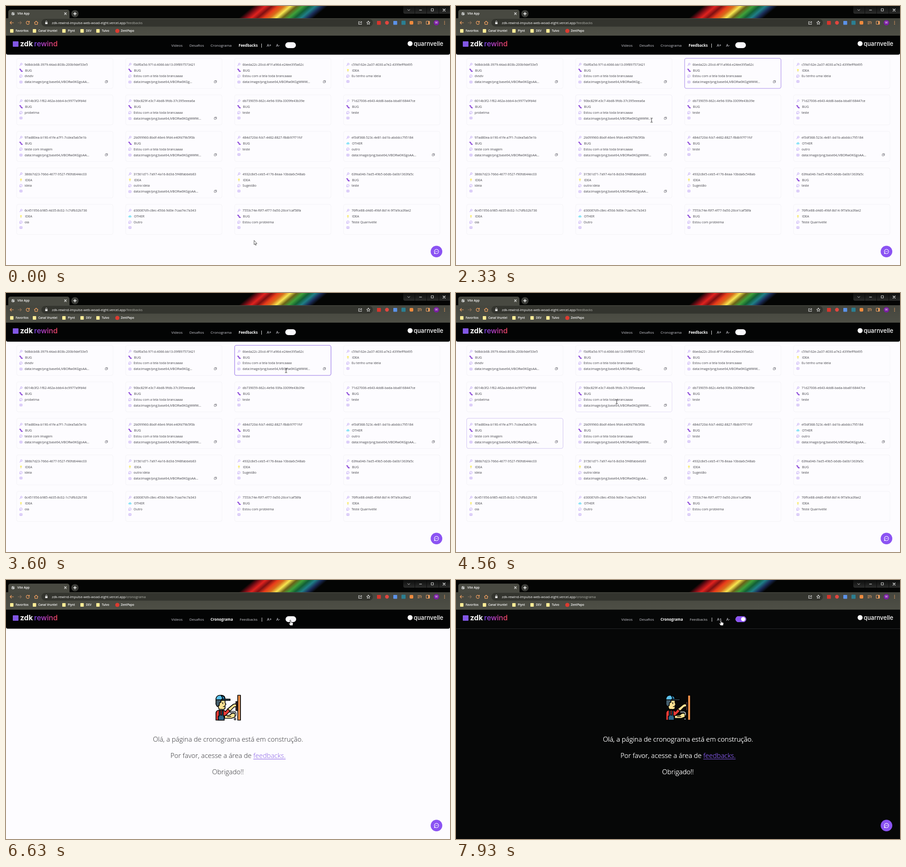
An HTML page with a canvas for the animation above (8 s loop, 979x572 px).

```html
<!DOCTYPE html>
<html lang="pt">
<head>
<meta charset="utf-8">
<title>Feedbacks</title>
<style>
  html, body { margin: 0; width: 100%; height: 100%; overflow: hidden; background: #000; }
  canvas { display: block; width: 979px; height: 572px; }
</style>
</head>
<body>
<canvas id="stage"></canvas>
<script>
const W = 979, H = 572, LOOP = 8000;
const PAGE_SWITCH = 5230, DARK_SWITCH = 6900;
const PURPLE = '#8257e5', LILAC = '#ad8cf0', ORANGE = '#f0a060', GREY = '#c8c8d0';
const SANS = '"Open Sans", "Noto Sans", sans-serif';

const canvas = document.getElementById('stage');
const ctx = canvas.getContext('2d');
const ratio = window.devicePixelRatio || 1;
canvas.width = W * ratio;
canvas.height = H * ratio;

// ---------- helpers ----------
const clamp = v => Math.max(0, Math.min(1, v));

function box(x, y, w, h, r, fill, stroke, width = 1) {
  ctx.beginPath();
  ctx.roundRect(x, y, w, h, r);
  if (fill) { ctx.fillStyle = fill; ctx.fill(); }
  if (stroke) { ctx.strokeStyle = stroke; ctx.lineWidth = width; ctx.stroke(); }
}

function dot(x, y, r, fill, stroke, width = 1) {
  ctx.beginPath();
  ctx.arc(x, y, r, 0, Math.PI * 2);
  if (fill) { ctx.fillStyle = fill; ctx.fill(); }
  if (stroke) { ctx.strokeStyle = stroke; ctx.lineWidth = width; ctx.stroke(); }
}

function shape(x, y, d, fill, stroke, width = 1) {
  const p = new Path2D(d);
  ctx.save();
  ctx.translate(x, y);
  ctx.lineCap = ctx.lineJoin = 'round';
  if (fill) { ctx.fillStyle = fill; ctx.fill(p); }
  if (stroke) { ctx.strokeStyle = stroke; ctx.lineWidth = width; ctx.stroke(p); }
  ctx.restore();
}

// y is the middle of the capitals
function label(text, x, y, size, color, weight = 400, align = 'left', family = SANS) {
  ctx.font = `${weight} ${size}px ${family}`;
  ctx.textAlign = align;
  ctx.fillStyle = color;
  ctx.fillText(text, x, y + size * 0.36);
  return ctx.measureText(text).width;
}

function gradient(x0, y0, x1, y1, ...colors) {
  const g = ctx.createLinearGradient(x0, y0, x1, y1);
  colors.forEach((c, i) => g.addColorStop(i / (colors.length - 1), c));
  return g;
}

// ---------- cards ----------
const mime = 'image/png';
const image = tail => `data:${mime};base${64},iVBORw0KGg${tail}...`;
const BLANK = 'Estou com a tela toda brancaaaa';
const CARDS = [
  ['9d8dcb68-3979-44ad-803b-200b9def33e5', 'BUG', 'dvsdv', image('oAA')],
  ['f3df0a5d-971d-4066-bb13-09f897573421', 'BUG', BLANK, image('')],
  ['6beda22c-20cd-4f1f-a96d-e24ee395a62c', 'BUG', BLANK, image('WWW')],
  ['c59d162e-2a37-4030-a7e2-4399efffd495', 'IDEA', 'Eu tenho uma ideia'],
  ['6014b3f2-1f82-462a-bbb4-bc9977a9fd4d', 'BUG', 'probelma'],
  ['90bc829f-e3c7-4bd8-9fdb-37c395eeea6a', 'BUG', BLANK, image('WWW')],
  ['db739059-662c-4e9d-93fa-3309fe43b39e', 'BUG', 'teste'],
  ['71d27006-e643-4dd8-bada-bba8168447ce', 'BUG', 'teste'],
  ['97ad80ea-b190-41fe-a7f1-7cdea5ab5e1b', 'BUG', 'teste com imagem', image('oAA')],
  ['2b099960-8bdf-46e4-9fd4-e40fd79b5f0b', 'BUG', BLANK, image('WWW')],
  ['484d720d-fcb7-4482-8827-f8db97f71fcf', 'BUG', 'teste'],
  ['ef3df368-523c-4e81-bd1b-abddcc795184', 'OTHER', 'outro', image('oAA')],
  ['386b7d23-766d-4677-9527-f90fd644ec03', 'IDEA', 'ideia'],
  ['31561d71-7a97-4a16-8d3d-5f48fabbeb83', 'IDEA', 'outra ideia', image('oAA')],
  ['4932c8e5-ceb5-4176-8eaa-10bda6c548ab', 'IDEA', 'Sugestão'],
  ['63fea046-7ad5-49b5-b6db-0a0b1363fa5c', 'BUG', 'teste'],
  ['6c451956-b985-4d35-8c02-1c7dfb32b736', 'IDEA', 'ola'],
  ['d30087d9-c8ec-450d-9d0e-7caa7ec7a343', 'OTHER', 'Outro'],
  ['7553c74e-f6f7-4f77-9a50-26ce1caf58fa', 'BUG', 'Estou com problema'],
  ['76ffce88-d4d0-49bf-8d14-9f7a9ca3fae2', 'IDEA', 'Teste Quarnvelle'],
].map(([id, kind, text, shot], i) =>
  ({ id, kind, text, shot, x: 23 + 240.3 * (i % 4), y: 115 + 80.65 * Math.floor(i / 4) }));
const CARD_W = 213, CARD_H = 67;

const inside = (p, c) => p.x > c.x && p.x < c.x + CARD_W && p.y > c.y && p.y < c.y + CARD_H;

const KIND_ICONS = {
  BUG: (x, y) => shape(x, y, 'M-2.6-2.4Q-.6-2.8-.2-.2T3 2.2', null, '#8a45d8', 2.2),
  IDEA(x, y) {
    dot(x, y - 0.8, 2.1, '#fbef7a');
    box(x - 0.9, y + 1.2, 1.8, 2, 0.5, '#e3d98c');
  },
  OTHER(x, y) {
    box(x - 3.6, y - 1.4, 7.2, 3.8, 1.9, '#8fe4f7');
    dot(x + 0.3, y - 0.7, 2, '#8fe4f7');
  },
};

function bubble(x, y, r, color, width) {
  dot(x, y, r, null, color, width);
  shape(x, y, `M${-r * 0.8} ${r * 0.55}L${-r} ${r}L${-r * 0.4} ${r * 0.9}`, null, color, width);
  for (const k of [-1, 0, 1]) dot(x + k * r * 0.45, y, r * 0.16, color);
}

function drawCard(card, glow) {
  const { x, y } = card, left = x + 10, tx = x + 18, top = y + 14;
  box(x + 0.5, y + 0.5, CARD_W - 0.5, CARD_H - 0.5, 4, null, '#f4f3f7');
  if (glow > 0) {
    ctx.globalAlpha = glow * glow;
    box(x + 0.5, y + 0.5, CARD_W - 0.5, CARD_H - 0.5, 4, null, PURPLE, 1.1);
    ctx.globalAlpha = 1;
  }
  const line = (text, dx, dy) => label(text, tx + dx, top + dy, 7.15, '#424248');
  dot(left + 0.8, top - 0.8, 1.9, null, LILAC, 0.8);
  shape(left, top, 'M-.6.6L-2.8 2.9', null, LILAC, 0.9);
  line(card.id, 0, 0);
  KIND_ICONS[card.kind](left, top + 13);
  line(card.kind, 1, 13);
  bubble(left, top + 25.7, 2.8, LILAC, 0.7);
  line(card.text, 0, 25.7);
  const camY = top + (card.shot ? 38.7 : 37.5);
  box(left - 2.9, camY - 2, 5.8, 4.5, 1, null, LILAC, 0.7);
  dot(left, camY + 0.3, 1.1, null, LILAC, 0.7);
  if (card.shot) {
    line(card.shot, 0, 38.7);
    box(x + 195.8, top + 36.9, 3.8, 3.8, 0.4, null, '#55555c', 0.7);
    shape(x + 197, top + 35.7, 'M0 0H4V4', null, '#55555c', 0.7);
  }
}

// ---------- pointer ----------
const TRACK = [
  [0, 547, 518], [1230, 547, 518], [1650, 590, 380], [2060, 625, 160], [2240, 600, 160],
  [2330, 432, 251], [2600, 150, 395], [2850, 110, 400], [3150, 330, 300], [3450, 600, 175],
  [3600, 617, 171], [3760, 600, 165], [4150, 150, 315], [4350, 180, 300], [4600, 380, 225],
  [4900, 490, 88], [6060, 490, 88], [6600, 627, 88], [7150, 627, 88], [7700, 584, 88], [LOOP, 584, 88],
];

function slope(i, axis) {
  const a = TRACK[i - 1], b = TRACK[i], c = TRACK[i + 1];
  if (!a || !c) return 0;
  const before = b[axis] - a[axis], after = c[axis] - b[axis];
  return before * after <= 0 ? 0 : (before + after) / (c[0] - a[0]);
}

function pointerAt(t) {
  let i = 0;
  while (i < TRACK.length - 2 && TRACK[i + 1][0] <= t) i++;
  const a = TRACK[i], b = TRACK[i + 1], span = b[0] - a[0], u = (t - a[0]) / span;
  const along = axis => {
    const u2 = u * u, u3 = u2 * u;
    return (2 * u3 - 3 * u2 + 1) * a[axis] + (3 * u2 - 2 * u3) * b[axis]
      + span * ((u3 - 2 * u2 + u) * slope(i, axis) + (u3 - u2) * slope(i + 1, axis));
  };
  return { x: along(1), y: along(2) };
}

// Border glow of every card, stepped from the first move up to t
function glowsAt(t) {
  const glows = CARDS.map(() => 0), step = 10;
  for (let u = 1230; u < t; u += step) {
    const p = pointerAt(u);
    CARDS.forEach((c, i) => {
      glows[i] = clamp(glows[i] + (inside(p, c) ? step / 200 : -step / 300));
    });
  }
  return glows;
}

const overItem = (p, x0, x1) => p.y > 78 && p.y < 97 && p.x > x0 && p.x < x1;
const LINKS = [[364, 390], [405, 437], [451, 501], [513, 555], [575, 587], [595, 606], [616, 640]];

function drawPointer(p, onCards) {
  const card = onCards && CARDS.find(c => inside(p, c));
  if (LINKS.some(([a, b]) => overItem(p, a, b))) {
    shape(p.x, p.y, 'M-1 1Q0-.4 1 1V5L5 6Q6.4 6.4 6 8.4L5 12.6H-.4L-3.6 8Q-3.6 6.4-1 8Z', '#fff', '#111', 0.8);
  } else if (card && p.x > card.x + 18 && p.x < card.x + 194 && p.y > card.y + 8 && p.y < card.y + 60) {
    shape(p.x + 0.5, p.y + 0.5, 'M-2-4.5H-.6L0-4L.6-4.5H2M0-4V4M-2 4.5H-.6L0 4L.6 4.5H2', null, '#222', 0.9);
  } else {
    shape(p.x, p.y, 'M0 0V9L2 7.2L3.4 10.4L4.8 9.8L3.4 6.7H6Z', '#fff', '#222', 0.8);
  }
}

// ---------- browser ----------
function drawBrowser(path) {
  box(0, 0, W, 28, 0, '#040504');
  ctx.save();
  ctx.beginPath();
  ctx.rect(0, 0, W, 27);
  ctx.clip();
  ctx.transform(1, 0, -1.2, 1, 0, 0);
  box(545, 0, 165, 27, 0, gradient(545, 0, 710, 0, '#040504', '#7a0d16', '#e0231f', '#7c1012', '#e83a1a',
    '#d8701c', '#f6e650', '#6a6018', '#3fa03a', '#126034', '#1f7f86', '#1a2c58', '#040504'));
  ctx.restore();

  box(876, 0, 103, 17, [0, 0, 0, 4], gradient(0, 0, 0, 17, '#0c0d0c', '#2b2c2b'));
  for (const x of [901, 927, 954]) box(x, 0, 1, 17, 0, '#0a0a0a');
  shape(888, 9, 'M-2.5-1.2L0 1.2L2.5-1.2', null, '#ddd', 0.9);
  shape(914, 9, 'M-2.5 0H2.5', null, '#eee');
  box(937.5, 6, 5, 5, 0, null, '#eee', 0.9);
  shape(966, 9, 'M-2.5-2.5L2.5 2.5M2.5-2.5L-2.5 2.5', null, '#fff', 1.1);

  box(0, 27, W, 39, 0, gradient(0, 27, 0, 66, '#45463e', '#4e4f46'));
  box(5, 8, 135, 20, [5, 5, 0, 0], '#484941');
  dot(15.5, 17, 3.6, '#c8cac8');
  shape(15.5, 17, 'M-3-1Q-1 0-.5 2M.5-3Q0-1 3-.5', null, '#5a5c58', 1);
  label('Vite App', 25, 17, 6.7, '#fff', 600);
  shape(131, 17, 'M-2-2L2 2M2-2L-2 2', null, '#fff', 1.2);
  dot(152, 17, 8, '#3b3c38');
  shape(152, 17, 'M-3 0H3M0-3V3', null, '#fff', 1.5);

  shape(12.5, 37, 'M4 0H-3.5M-.5-3L-3.5 0L-.5 3', null, ORANGE, 1.2);
  shape(30.5, 37, 'M-4 0H3.5M.5-3L3.5 0L.5 3', null, '#8b7058', 1.1);
  shape(48, 37, 'M3.1-1.6A3.5 3.5 0 1 0 3.4 1M3.6-3.6V-1.2H1.2', null, ORANGE, 1.2);
  shape(66.5, 37, 'M-4 0L0-3.6L4 0M-2.8-.6V3.6H2.8V-.6', null, ORANGE, 1.2);

  box(78, 28.5, 731, 17, 8.5, '#33342e');
  box(86.5, 36, 5, 4, 0.6, '#eee');
  shape(89, 36, 'M-1.5 0V-1.5A1.5 1.5 0 0 1 1.5-1.5V0', null, '#eee', 0.9);
  label('zdk-rewind-impulse-web-woad-eight.vercel.app', 263.5, 37, 7.4, '#fff', 500, 'right');
  label('/' + path, 263.5, 37, 7.4, '#b4b5af');
  shape(781, 37, 'M-1-2.5H-3.5V3.5H3V1.5M-1.5 1Q-1-1.6 3.5-1.6M1.8-3.4L3.6-1.6L1.8 .2', null, '#eee', 0.9);
  shape(799, 37, 'M0-3.8L1.1-1.2L3.9-1L1.8.9L2.4 3.6L0 2.1L-2.4 3.6L-1.8.9L-3.9-1L-1.1-1.2Z', null, '#fff', 0.9);

  box(818, 33, 8.5, 8.5, 1, '#d8352c');
  dot(840, 37, 4.2, '#e0463f');
  box(854, 33, 8.5, 8.5, 1, '#5b92e8');
  box(872, 32.5, 9, 9, 1, '#2b7f92');
  box(890, 33, 8, 8, 2, '#ee8a3d');
  shape(912, 37, 'M-4-2.6H3M-4 0H1M-4 2.6H-.5M3.2 2.6V-1H4.4', null, ORANGE, 1);
  box(926.5, 33.5, 7.5, 7, 0.5, null, ORANGE, 1);
  box(931, 33.5, 3, 7, 0, ORANGE);
  dot(949, 37, 6, '#7a1fa2');
  label('W', 949, 37, 6.5, '#fff', 400, 'center');
  for (const y of [33.8, 37, 40.2]) dot(967, y, 0.9, ORANGE);

  const marks = [[9, 'Favoritos'], [59, 'Canal Vruntel'], [124, 'Plynt'], [164, 'DEV'], [199, 'Tulvo'], [241, 'ZentPapo']];
  marks.forEach(([x, name], i) => {
    if (i === 5) dot(x + 4.5, 55, 4.6, '#dc3b30');
    else box(x, 51, 7.5, 8, 1, '#fdec96');
    label(name, x + 12.2, 55, 6.4, '#fff', 600);
  });
}

// ---------- page ----------
function drawHeader(t, p) {
  const second = t >= PAGE_SWITCH, dark = t >= DARK_SWITCH;
  box(0, 65.5, W, 42, dark ? 0 : [0, 0, 4, 4], dark ? '#060707' : '#030404');
  if (dark) box(0, 107, W, 1, 0, '#26272a');

  box(15, 78, 12.5, 12, 1, PURPLE);
  label('zdk', 31, 83.5, 16, '#fff', 700, 'left', 'Inter, sans-serif');
  label('rewind', 62, 83.5, 16, gradient(62, 0, 113, 0, '#7c4af0', '#c43fc4', '#f0465c'), 500, 'left', 'Inter, sans-serif');
  dot(891, 83, 5.5, '#fff');
  label('quarnvelle', 899, 83, 13, '#fff', 500, 'left', 'Inter, sans-serif');

  const shift = second ? 0.6 : 0;
  const link = (text, x, x1, active) =>
    label(text, x, 87, 8, active || overItem(p, x, x1) ? '#fff' : GREY, active ? 700 : 400);
  link('Vídeos', 364.5, 390, false);
  link('Desafios', 404.5, 437, false);
  link('Cronograma', 451, 501, second);
  if (second) {
    const v = Math.round(255 - 55 * clamp((t - PAGE_SWITCH - 100) / 250));
    label('Feedbacks', 515.5, 87, 8, overItem(p, 515, 555) ? '#fff' : `rgb(${v},${v},${v + 4})`);
  } else {
    link('Feedbacks', 513, 555, true);
  }
  label('|', 563.5 + shift, 87, 8, '#fff', 700, 'center');
  label('A+', 575 + shift, 87, 8, GREY, 600);
  label('A-', 595.5 + shift, 87, 8, GREY, 600);

  const on = clamp((t - DARK_SWITCH) / 150);
  box(615.8 + shift, 80, 23.4, 13, 6.5, '#f7f6fa');
  ctx.globalAlpha = on;
  box(615.8 + shift, 80, 23.4, 13, 6.5, '#8b53f3');
  ctx.globalAlpha = 1;
  dot(622 + shift + 10.6 * on, 86.5, 4.6, '#fff');
}

function drawWorker(x, y) {
  const part = (d, fill) => shape(x, y, d, fill, '#000', 1.7);
  part('M50 1H56V56H50Z', '#ef914a');
  part('M46 15H50V35H46Z', '#4a3034');
  part('M5 12H22V18L24 21L22 23V30Q20 33 14 32H9L7 27Z', '#ffe394');
  part('M2 11H13V17H10L9 24L5 26Q1 22 2 17Z', '#46606e');
  part('M2 11V8Q4 1 11 1H15Q22 2 22 9V11Z', '#5cc3ee');
  part('M13 1.5Q17 5 16 11H22Q22 2 13 1.5Z', '#2f7fae');
  part('M15 9.5H33V12.5H15Z', '#37505c');
  part('M2 56V40Q3 34 9 34H19L23 37L28 31L33 36L23 46L20 47V56Z', '#ec3c37');
  part('M7 56V47H9V35H12V45H15V35H18V47H20V56Z', '#2e6688');
  part('M28 31L39 22Q43 19 47 21V26L42 27L33 36Z', '#ffe394');
  part('M21 46L32 45L37 41H44V49L36 52H21Z', '#ffe394');
  shape(x, y, 'M34 38H42Q46 39 45 45', null, '#000', 4);
  shape(x, y, 'M34 38H42Q46 39 45 45', null, '#eef2f4', 1.4);
  shape(x, y, 'M17 17V20M18 26H21M27 48H35', null, '#000', 1.5);
  dot(x + 44, y + 53.5, 1.9, '#c9d2d8', '#000', 1.3);
}

function drawNotice(dark) {
  const ink = dark ? '#fff' : '#27272a', size = 14.9;
  // light strokes on black need a second coat to look as strong
  const write = (text, x, y, color, align) => {
    if (dark) label(text, x, y, size, color, 300, align);
    return label(text, x, y, size, color, 300, align);
  };
  drawWorker(461, 253.5);
  write('Olá, a página de cronograma está em construção.', W / 2, 352, ink, 'center');
  const lead = 'Por favor, acesse a área de ', link = 'feedbacks.';
  const x = W / 2 - ctx.measureText(lead + link).width / 2;
  const linkX = x + write(lead, x, 387.5, ink);
  const linkW = write(link, linkX, 387.5, PURPLE);
  box(linkX, 395, linkW, 1, 0, PURPLE);
  write('Obrigado!!', W / 2, 424, ink, 'center');
}

function draw(t) {
  const second = t >= PAGE_SWITCH, dark = t >= DARK_SWITCH, p = pointerAt(t);
  ctx.setTransform(ratio, 0, 0, ratio, 0, 0);
  box(0, 0, W, H, 0, dark ? '#060707' : '#fdfcff');
  drawBrowser(second ? 'cronograma' : 'feedbacks');
  drawHeader(t, p);
  if (second) {
    drawNotice(dark);
  } else {
    const glows = glowsAt(t);
    CARDS.forEach((card, i) => drawCard(card, glows[i]));
  }
  dot(949.2, 542.2, 12.8, '#8b53f3');
  bubble(949.2, 542.2, 4.8, '#fff', 1.1);
  drawPointer(p, !second);
}

const start = performance.now();
function tick() {
  draw((performance.now() - start) % LOOP);
  requestAnimationFrame(tick);
}
tick();
</script>
</body>
</html>
```
